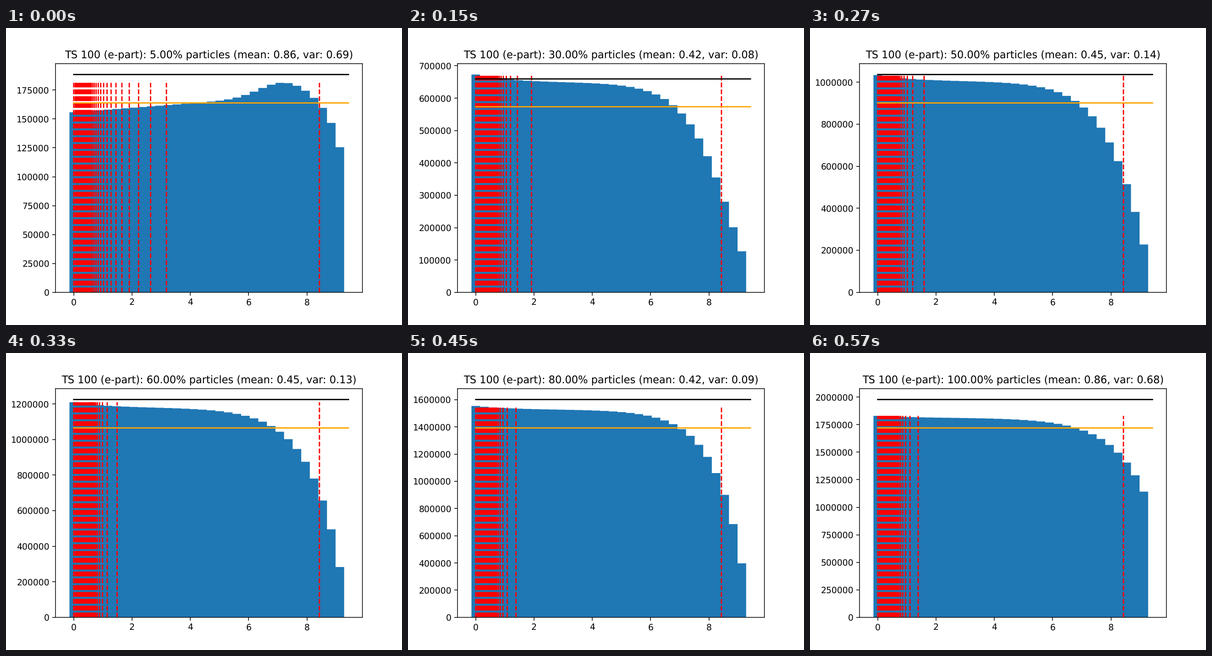
Write a matplotlib script that moves like this. It is 864 px wide and 648 px high and loops after 0.6 s.

```python
import numpy as np
import matplotlib.pyplot as plt
from matplotlib.animation import FuncAnimation

plt.rcParams.update({"path.snap": False, "text.hinting": "none"})

STEPS = 20
BINS = 32
SPAN = 3 * np.pi
WIDTH = SPAN / BINS
UNIT = 81920          # mean count added to every bin per step
FAR = 8.43            # outermost marker

# Key points over the steps; everything between is interpolated.
KEYS = [0, 3, 5, 7, 11, 15, 19]
MEAN = [0.86, 0.44, 0.42, 0.45, 0.45, 0.42, 0.86]
VAR = [0.69, 0.10, 0.08, 0.14, 0.13, 0.09, 0.68]
# Right-hand fall of the histogram: depth at the last bin, growth, curve type
DEPTH = [0.28, 2.1, 1.62, 1.56, 0.76, 0.74, 0.37]
RATE = [0.55, 0.36, 0.33, 0.335, 0.27, 0.295, 0.25]
BEND = [1, -1, 0.01, 0.01, 1, 1, 1]
# Markers thin out as reach * (1 + n / knee) ** -power
REACH = [3.18, 2.3, 1.913, 1.693, 1.489, 1.379, 1.387]
KNEE = [9, 2.4, 1.2, 1.05, 1, 1.05, 1.4]
POWER = [1.78, 0.73, 0.48, 0.455, 0.375, 0.365, 0.42]


def at(k, values):
    return np.interp(k, KEYS, values)


def level(k):
    return UNIT * (k + 2)


def histogram(k):
    """Bin counts: a flat body, an early hump, and a fall to the right."""
    i = np.arange(BINS)
    rise = np.interp(k, [0, 4, STEPS - 1], [0, 0.04, 0.01])
    hump = 0.084 * np.exp(-k)
    body = (1 + rise * np.exp(-i / 4)
            + hump * (i / 23 + np.exp(-((i - 24.5) / 4) ** 2)))
    bend = at(k, BEND)
    fall = at(k, DEPTH) * np.exp(-at(k, RATE) * (BINS - 1 - i))
    shape = body * (1 - bend * fall) ** (1 / bend)
    return shape / shape.mean() * level(k)


def markers(k):
    n = np.arange(40)
    sparse = at(k, REACH) * (1 + n / at(k, KNEE)) ** -at(k, POWER)
    sparse = sparse[sparse > 0.58]
    dense = np.arange(0.05, sparse[-1], 0.035)
    return [0, *dense, *sparse, FAR]


HISTOGRAMS = np.array([histogram(k) for k in KEYS])
EDGES = (np.arange(BINS + 1) - 0.5) * WIDTH

fig, ax = plt.subplots(figsize=(6.4, 4.8), dpi=135)


def draw(k):
    ax.clear()
    counts = np.array([at(k, column) for column in HISTOGRAMS.T])
    top, mean = counts.max(), level(k)
    ax.stairs(counts, EDGES, fill=True, color="C0")
    for x in markers(k):
        ax.plot([x, x], [0, top], "r--")
    ax.plot([0, SPAN], [1.15 * mean] * 2, color="black")
    ax.plot([0, SPAN], [mean] * 2, color="orange")
    ax.set_ylim(0, 1.05 * max(top, 1.15 * mean))
    ax.ticklabel_format(style="plain", axis="y")
    ax.set_title(f"TS 100 (e-part): {5 * (k + 1):.2f}% particles "
                 f"(mean: {at(k, MEAN):.2f}, var: {at(k, VAR):.2f})")


anim = FuncAnimation(fig, draw, frames=STEPS, interval=30, repeat=True)
plt.show()
```
